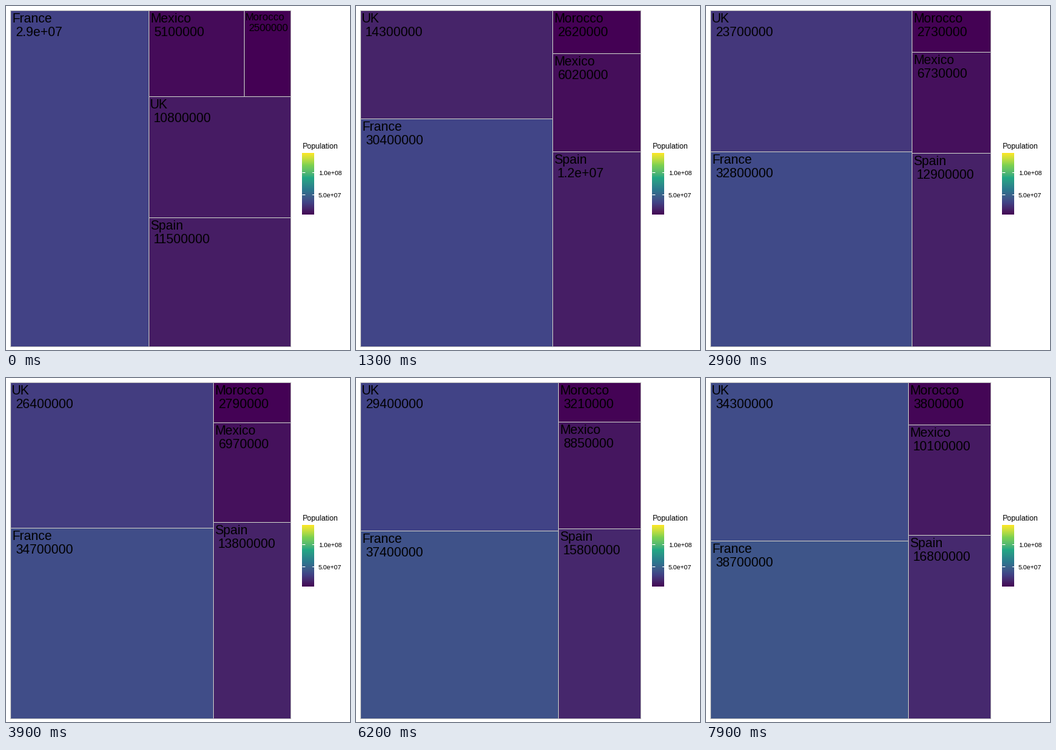
Write a matplotlib script that moves like this. It is 480x480 px and loops after 8000 ms.

```python
import numpy as np
import matplotlib.pyplot as plt
from matplotlib.animation import FuncAnimation
from matplotlib.patches import Rectangle

SIZE, DPI = 480, 80
PT = 72 / DPI  # points per pixel
FRAMES, INTERVAL = 80, 100
LEFT, TOP, WIDTH, HEIGHT = 5.48, 5.48, 391, 469
FONT, PAD = 18, 2.6
LOW, HIGH = 2.5, 140

plt.rcParams["font.family"] = "Liberation Sans"

# Population in millions, one value per decade
YEARS = np.arange(0, 90, 10)
PEOPLE = {
    "France": [29.0, 30.0, 31.3, 33.0, 34.85, 36.3, 37.25, 38.0, 38.8],
    "Spain": [11.5, 11.85, 12.2, 13.0, 13.9, 14.9, 15.64, 16.2, 16.86],
    "UK": [10.8, 11.43, 21.0, 24.0, 26.7, 27.18, 28.84, 31.4, 34.62],
    "Mexico": [5.1, 5.8, 6.53, 6.75, 6.99, 7.66, 8.73, 9.33, 10.19],
    "Morocco": [2.5, 2.592, 2.685, 2.735, 2.795, 2.84, 3.14, 3.49, 3.834],
}

# Viridis stops blended in Lab space
STOPS = ["440154", "414487", "2A788E", "22A884", "7AD151", "FDE725"]
TO_XYZ = np.array([[0.4124, 0.3576, 0.1805],
                   [0.2126, 0.7152, 0.0722],
                   [0.0193, 0.1192, 0.9505]])
WHITE = TO_XYZ.sum(axis=1)
TO_LAB = np.array([[0, 116, 0], [500, -500, 0], [0, 200, -200]])


def rgb_to_lab(rgb):
    lin = np.where(rgb > 0.04045, ((rgb + 0.055) / 1.055) ** 2.4, rgb / 12.92)
    xyz = lin @ TO_XYZ.T / WHITE
    f = np.where(xyz > 0.008856, np.cbrt(xyz), 7.787 * xyz + 16 / 116)
    return f @ TO_LAB.T


def lab_to_rgb(lab):
    f = lab @ np.linalg.inv(TO_LAB).T
    xyz = np.where(f > 0.2069, f ** 3, (f - 16 / 116) / 7.787)
    lin = np.clip((xyz * WHITE) @ np.linalg.inv(TO_XYZ).T, 0, 1)
    rgb = np.where(lin > 0.0031308, 1.055 * lin ** (1 / 2.4) - 0.055, 12.92 * lin)
    return np.clip(rgb, 0, 1)


STOP_LAB = rgb_to_lab(np.array([list(bytes.fromhex(s)) for s in STOPS]) / 255)


def shade(value):
    t = np.clip((np.atleast_1d(value) - LOW) / (HIGH - LOW), 0, 1) * 5
    lab = np.stack([np.interp(t, np.arange(6), c) for c in STOP_LAB.T], axis=-1)
    return lab_to_rgb(lab)


def worst_ratio(row, total, w, h):
    """Largest aspect ratio when the row fills the short side of w x h."""
    long, short = max(w, h), min(w, h)
    depth = long * sum(row) / total
    sides = [short * v / sum(row) for v in row]
    return max(max(depth / s, s / depth) for s in sides)


def squarify(items):
    """Tiles (x, y, w, h) in the unit square, growing from the bottom left."""
    items = sorted(items, key=lambda it: -it[1])
    x = y = 0.0
    w = h = 1.0
    tiles = {}
    while items:
        values = [v for _, v in items]
        total = sum(values)
        n = 1
        while n < len(values) and (worst_ratio(values[:n + 1], total, w, h)
                                   <= worst_ratio(values[:n], total, w, h)):
            n += 1
        row = sum(values[:n])
        share = row / total
        at = 0.0
        for name, v in items[:n]:
            part = v / row
            if w >= h:
                tiles[name] = (x, y + at * h, w * share, part * h)
            else:
                tiles[name] = (x + at * w, y, part * w, h * share)
            at += part
        if w >= h:
            x, w = x + w * share, w * (1 - share)
        else:
            y, h = y + h * share, h * (1 - share)
        items = items[n:]
    return tiles


def number(value):
    """Three significant digits, in whichever notation is shorter."""
    mantissa, exp = f"{value:.2e}".split("e")
    mantissa = mantissa.rstrip("0").rstrip(".")
    fixed = f"{float(mantissa) * 10 ** int(exp):.0f}"
    sci = f"{mantissa}e{exp}"
    return fixed if len(fixed) <= len(sci) else sci


fig = plt.figure(figsize=(SIZE / DPI, SIZE / DPI), dpi=DPI, facecolor="white")
ax = fig.add_axes([0, 0, 1, 1])
ax.axis("off")


def write(x, y, text, size):
    return ax.text(x, y, text, fontsize=size * PT, color="black",
                   ha="left", va="baseline", zorder=5)


# Legend
ramp = shade(np.linspace(HIGH, LOW, 300))[:, None, :]
ax.imshow(ramp, extent=(413, 430, 291, 205), aspect="auto",
          interpolation="bilinear")
write(413, 199, "Population", 10.5)
for y, text in ((231.5, "1.0e+08"), (262.5, "5.0e+07")):
    for x in (413, 426.5):
        ax.plot([x, x + 3.5], [y, y], color="white", lw=PT,
                solid_capstyle="butt")
    write(436, y + 4.5, text, 9)

boxes, heads, counts = {}, {}, {}
for name in PEOPLE:
    boxes[name] = ax.add_patch(Rectangle((0, 0), 1, 1, ec="#BEBEBE", lw=PT))
    heads[name] = write(0, 0, name, FONT)
    counts[name] = write(0, 0, "", FONT)

ax.set_xlim(0, SIZE)
ax.set_ylim(SIZE, 0)


def snap(v):
    return round(v) + 0.5


def draw(frame):
    now = {k: float(np.interp(frame, YEARS, v)) for k, v in PEOPLE.items()}
    for name, (x, y, w, h) in squarify(list(now.items())).items():
        x0, x1 = snap(LEFT + x * WIDTH), snap(LEFT + (x + w) * WIDTH)
        y0 = snap(TOP + (1 - y - h) * HEIGHT)
        y1 = snap(TOP + (1 - y) * HEIGHT)
        boxes[name].set_bounds(x0, y0, x1 - x0, y1 - y0)
        boxes[name].set_facecolor(shade(now[name])[0])

        text = number(now[name] * 1e6)
        size = min(FONT, (x1 - x0 - 2 * PAD) / (0.278 + 0.556 * len(text)))
        base = y0 + PAD + 0.82 * size
        heads[name].set_position((x0 + PAD, base))
        counts[name].set_position((x0 + PAD + 0.278 * size, base + 1.08 * size))
        counts[name].set_text(text)
        for label in (heads[name], counts[name]):
            label.set_fontsize(size * PT)
    return [*boxes.values(), *heads.values(), *counts.values()]


anim = FuncAnimation(fig, draw, frames=FRAMES, interval=INTERVAL,
                     repeat=True, repeat_delay=0, blit=False)
plt.show()
```
